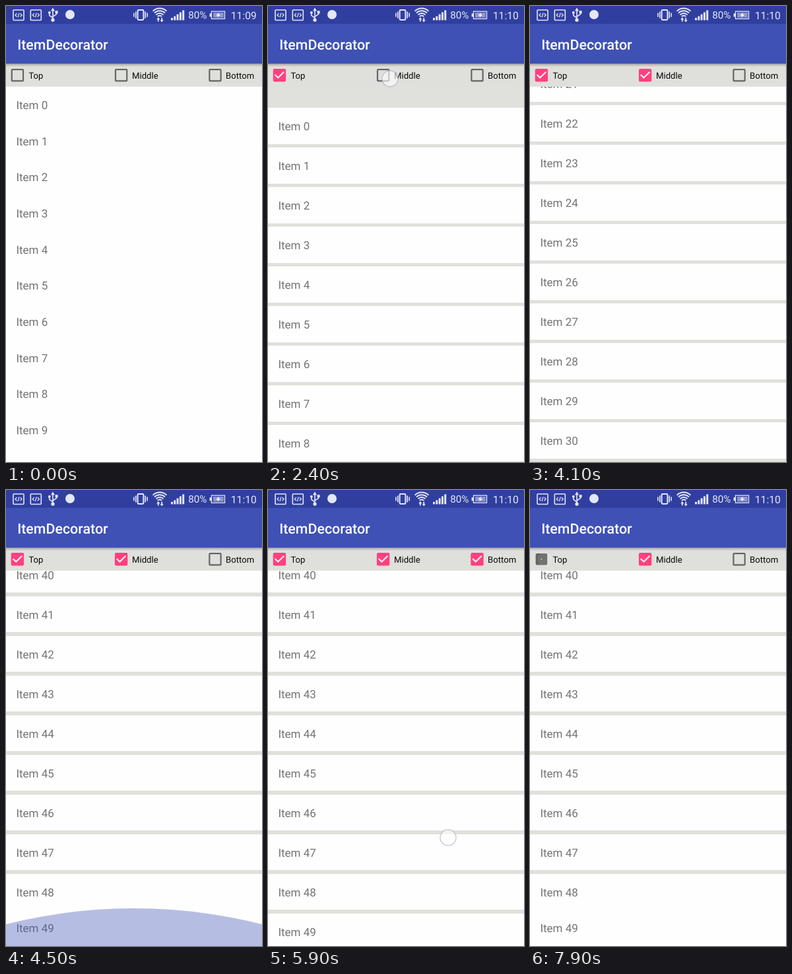
Animation, 388 px wide and 690 px high, one loop 8 s. Source, as an HTML page:

```html
<!DOCTYPE html>
<html lang="en">
<head>
<meta charset="utf-8">
<title>List decoration demo</title>
<style>
  html, body { margin: 0; width: 100%; height: 100%; overflow: hidden; background: #fefefe; }
  svg { display: block; font-family: Roboto, sans-serif; text-rendering: geometricPrecision; }
  .item { font-size: 17px; fill: #747474; }
  .label { font-size: 13.15px; fill: #080808; }
  .title { font-size: 21.4px; font-weight: 500; fill: #fff; }
  .line { fill: none; stroke: #e4e7f8; stroke-width: 1.6; }
  .solid { fill: #e4e7f8; }
</style>
</head>
<body>
<svg id="stage" width="388" height="690" viewBox="0 0 388 690">
  <defs>
    <linearGradient id="shade" x2="0" y2="1">
      <stop offset="0" stop-color="#000" stop-opacity=".26"/>
      <stop offset="1" stop-color="#000" stop-opacity="0"/>
    </linearGradient>
  </defs>

  <rect width="388" height="690" fill="#e0e0dc"/>
  <g id="list"></g>
  <ellipse id="glow" cx="194" rx="582" fill="#3f51b5"/>

  <rect y="87" width="388" height="35" fill="#dfe0db"/>
  <g id="boxes"></g>

  <rect y="87" width="388" height="5" fill="url(#shade)"/>
  <rect y="27" width="388" height="60.3" fill="#3f51b5"/>
  <text class="title" x="17.2" y="65.6">ItemDecorator</text>

  <rect width="388" height="27" fill="#303f9f"/>
  <g id="codeIcon">
    <rect class="line" x="11" y="6" width="16" height="15.5" rx="1"/>
    <path class="line" style="stroke-width:1.2" d="M16.5 11.3l-2.6 2.5 2.6 2.5M21.5 11.3l2.6 2.5-2.6 2.5M19.9 10.6l-1.8 6.4"/>
  </g>
  <use href="#codeIcon" x="26.3"/>
  <g id="usb">
    <path class="line" d="M71 6V20M71 18L65.8 14.4V10.5M71 16L76.6 12.4V9"/>
    <path class="solid" d="M71 2.6l3 4.8h-6zM74.6 7.2h4v4h-4z"/>
    <circle class="solid" cx="65.8" cy="10" r="2"/>
    <circle class="solid" cx="71" cy="21.2" r="2.6"/>
  </g>
  <circle class="solid" cx="97" cy="13" r="7"/>
  <g id="vibrate">
    <rect class="line" x="199.6" y="6" width="8.8" height="15" rx="1.4" style="stroke-width:2"/>
    <path class="line" d="M196.8 8.5v10M193.9 10.5v6M211.2 8.5v10M214.1 10.5v6"/>
  </g>
  <g id="wifi">
    <path class="line" style="stroke-width:1.9" d="M222.6 7.8a14.6 14.6 0 0 1 20.8 0M225 10.6a11.2 11.2 0 0 1 16 0M227.4 13.3a7.8 7.8 0 0 1 11.2 0M229.8 15.8a4.5 4.5 0 0 1 6.4 0"/>
    <path class="solid" d="M228.2 20.4l2.6-3.3 2.6 3.3h-1.7v3h-1.8v-3zM233.6 21.2l2.6 3.4 2.6-3.4h-1.7v-3.4h-1.8v3.4z"/>
  </g>
  <path id="signal" class="solid" d="M250 18h3v3.5h-3zM254.3 15.4h3v6.1h-3zM258.6 12.6h3v8.9h-3zM262.9 9.6h3v11.9h-3zM267.2 6.4h3v15.1h-3z"/>
  <text class="solid" x="276.2" y="19.4" font-size="15.2">80%</text>
  <g id="battery">
    <path class="solid" d="M308.6 11.3h2.4v5h-2.4z"/>
    <rect class="line" x="311.5" y="8.2" width="20" height="11.2" style="stroke-width:1.3"/>
    <rect x="314" y="10" width="15.8" height="7.6" fill="#8d96cb"/>
    <path d="M323.2 9.8l-5 4.6h3.3l-1.4 3.4 5.2-4.7h-3.3z" fill="#fff"/>
  </g>
  <text id="clock" class="solid" x="340.8" y="19.5" font-size="15.7"></text>

  <circle id="touch" r="12" fill="#fff" fill-opacity=".6" stroke="#b3b1c8" stroke-opacity=".7" stroke-width="1.4"/>
</svg>

<script>
const LOOP = 8000, STEP = 100;
const TOP = 122, VIEW = 568, ROW = 54.667, GAP = 5.333, PAD = 32, COUNT = 50;
const TOP_ON = 1300, GAPS_ON = 2400, BOTTOM_ON = 5200, BOTTOM_OFF = 7000;
const END = PAD + COUNT * ROW + (COUNT - 2) * GAP - VIEW;
const END_PADDED = END + GAP + PAD;

const $ = id => document.getElementById(id);
const clamp = v => Math.max(0, Math.min(1, v));

function make(tag, attrs, parent) {
  const el = document.createElementNS('http://www.w3.org/2000/svg', tag);
  set(el, attrs);
  parent.append(el);
  return el;
}
function set(el, attrs) {
  for (const k in attrs) el.setAttribute(k, attrs[k]);
}

// Linear interpolation over [time, value] pairs.
function track(t, keys) {
  if (t <= keys[0][0]) return keys[0][1];
  for (let i = 1; i < keys.length; i++) {
    const [a, from] = keys[i - 1], [b, to] = keys[i];
    if (t <= b) return from + (to - from) * (t - a) / (b - a);
  }
  return keys[keys.length - 1][1];
}

const rows = Array.from({ length: 13 }, () => ({
  back: make('rect', { width: 388, fill: '#fefefe' }, $('list')),
  text: make('text', { class: 'item', x: 15.4 }, $('list'))
}));

// toggles: moments at which the box flips, starting unchecked
const boxes = [
  { name: 'Top', x: 17.4, label: 34.4, toggles: [TOP_ON, 7746] },
  { name: 'Middle', x: 174.6, label: 191, toggles: [2420] },
  { name: 'Bottom', x: 317, label: 333.1, toggles: [BOTTOM_ON, BOTTOM_OFF] }
].map(b => {
  const g = make('g', { transform: `translate(${b.x} 104.7)` }, $('boxes'));
  b.fill = make('rect', { rx: 2 }, g);
  b.hole = make('rect', { fill: '#dfe0db' }, g);
  b.tick = make('path', {
    d: 'M-6.8 -.75L-2.15 3.9L6.8 -5.05', fill: 'none', stroke: '#f6f0f0',
    'stroke-width': 2.15, pathLength: 1
  }, g);
  make('text', { class: 'label', x: b.label, y: 109.6 }, $('boxes')).textContent = b.name;
  return b;
});

// Each touch: start, end, x keys, y keys
const touches = [
  [1100, 1300, [[0, 22]], [[0, 108]]],
  [2200, 2400, [[0, 185]], [[0, 110]]],
  [3600, 3850, [[3600, 316], [3800, 323]], [[3600, 345], [3700, 306], [3800, 208]]],
  [4900, 5100, [[0, 325]], [[0, 109]]],
  [5800, 6000, [[5900, 273], [6000, 281]], [[5800, 532], [5900, 526], [6000, 440]]],
  [6700, 6900, [[0, 325]], [[0, 109]]],
  [7600, 7800, [[0, 24]], [[0, 106]]]
];

// Each glow: start, peak, height scale, opacity
const glows = [[4350, 4500, .73, .38], [5980, 6080, .55, .13]];

function square(el, size) {
  set(el, { x: -size / 2, y: -size / 2, width: size, height: size });
}

function drawList(t) {
  const pad = t >= TOP_ON ? PAD : 0;
  const gap = t >= GAPS_ON ? GAP : 0;
  const padded = t >= BOTTOM_ON && t < BOTTOM_OFF;
  const scroll = t >= BOTTOM_OFF ? END : track(t, [
    [3600, 0], [3700, 25], [3800, 109], [3900, 420], [4350, END],
    [5930, END], [6000, END_PADDED]
  ]);
  const pitch = ROW + gap;
  const first = Math.max(0, Math.floor((scroll - pad) / pitch));
  rows.forEach(({ back, text }, k) => {
    const i = first + k;
    const lastShift = i === COUNT - 1 && !padded ? gap : 0;
    const y = TOP + pad + i * pitch - lastShift - scroll;
    const top = Math.round(y), shown = i < COUNT ? 'visible' : 'hidden';
    set(back, { y: top, height: Math.round(y + ROW) - top, visibility: shown });
    set(text, { y: y + 33.9, visibility: shown });
    text.textContent = 'Item ' + i;
  });
}

function drawBox(b, t) {
  const past = b.toggles.filter(x => x <= t);
  const on = past.length % 2 === 1;
  const phase = past.length ? clamp((t - past[past.length - 1]) / 280) : 1;
  const p = on ? phase : 1 - phase;
  square(b.fill, 19.4 - 2 * (1 - Math.abs(2 * p - 1)));
  square(b.hole, 15.1 * clamp(1 - 2 * p));
  set(b.fill, { fill: on ? '#ff4081' : '#646464' });
  set(b.tick, {
    'stroke-dasharray': `${clamp(2 * p - 1)} 2`,
    visibility: p > .5 ? 'visible' : 'hidden'
  });
}

function drawGlow(t) {
  let size = 0, alpha = 0;
  for (const [start, peak, s, a] of glows) {
    if (t < start || t > peak + 600) continue;
    const k = t < peak ? (t - start) / (peak - start) : (1 - (t - peak) / 600) ** 2;
    size = s * k;
    alpha = a * k;
  }
  set($('glow'), { cy: 690 + 504 * size, ry: 582 * size, opacity: alpha });
}

function drawTouch(t) {
  const hit = touches.find(([a, b]) => t >= a && t <= b + 100);
  if (!hit) return set($('touch'), { opacity: 0 });
  const [, end, xs, ys] = hit;
  set($('touch'), { cx: track(t, xs), cy: track(t, ys), opacity: t <= end ? 1 : .15 });
}

function draw(t) {
  drawList(t);
  boxes.forEach(b => drawBox(b, t));
  drawGlow(t);
  drawTouch(t);
  $('clock').textContent = t < 1000 ? '11:09' : '11:10';
}

const begin = performance.now();
function tick() {
  const t = (performance.now() - begin) % LOOP;
  draw(Math.floor(t / STEP) * STEP);
  requestAnimationFrame(tick);
}
tick();
</script>
</body>
</html>
```
